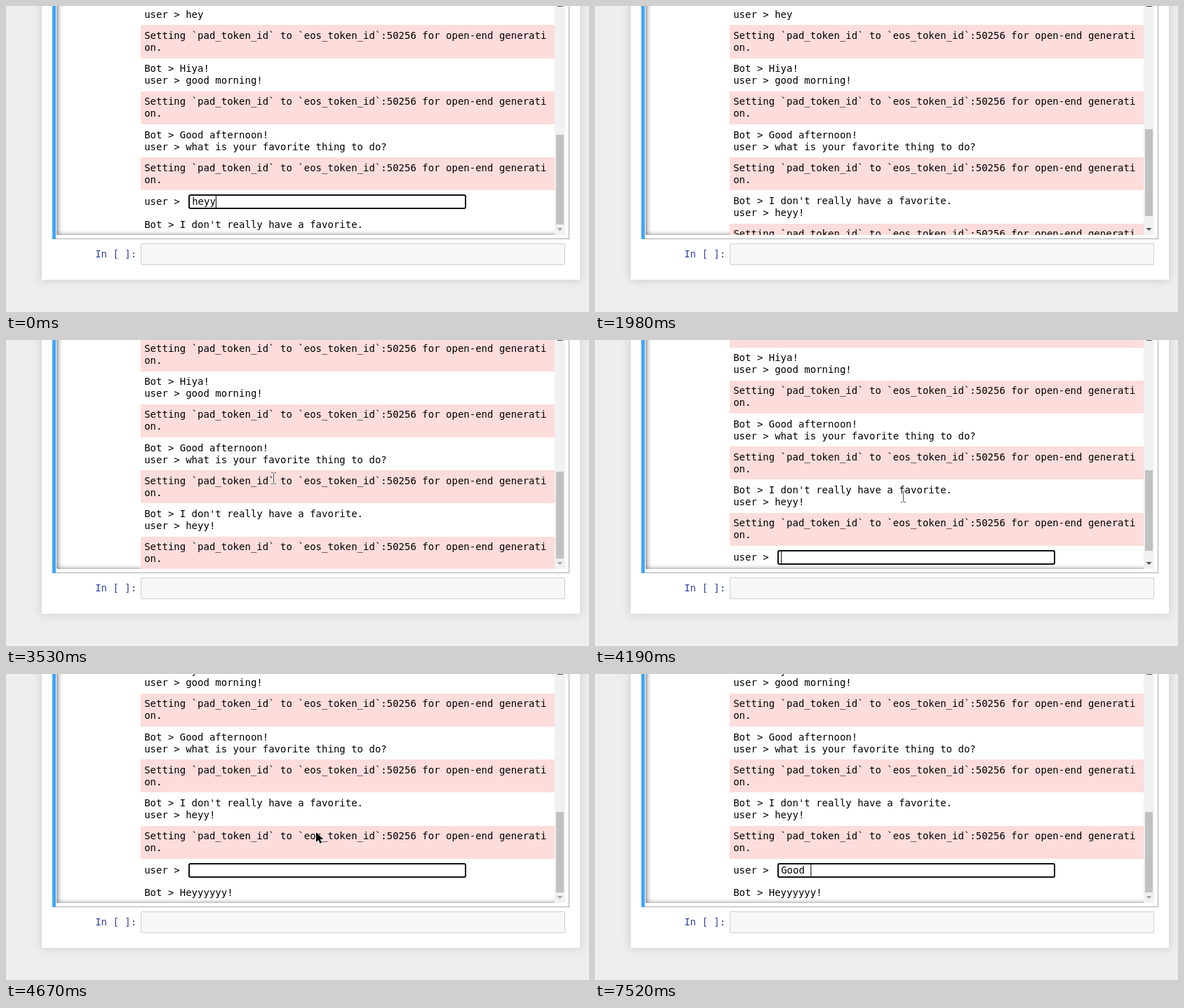
Animation of 831x437 px, one loop 8 s. Source, as an HTML page:

```html
<!DOCTYPE html>
<html lang="en">
<head>
<meta charset="utf-8">
<title>Notebook chat</title>
<style>
  html, body { margin: 0; width: 100%; height: 100%; overflow: hidden; background: #eee; }
  #stage { position: relative; width: 831px; height: 437px; overflow: hidden; background: #eee;
    font: 14px/17px "DejaVu Sans Mono", monospace; color: #000; }
  #stage div { position: absolute; box-sizing: border-box; white-space: pre; }
  #page { left: 51px; top: -40px; width: 767px; height: 431px; background: #fff;
    box-shadow: 0 0 12px 1px rgba(87, 87, 87, .2); }
  #cell { left: 66px; top: -40px; width: 737px; height: 373px; border: 1px solid #ababab; }
  #bar { left: 66px; top: 0; width: 5px; height: 333px; background: #42a5f5; }
  #shade { left: 72px; top: -40px; width: 725px; height: 367px; border-radius: 2px;
    box-shadow: inset 0 2px 8px rgba(0, 0, 0, .8); }
  #log { left: 0; top: 0; width: 782px; height: 327px; overflow: hidden; }
  #log .err { left: 192px; width: 590px; background: #fddcdc; }
  #log .line { left: 197.2px; height: 17px; }
  #log .field { left: 260px; width: 396px; height: 21px; background: #fff;
    border: 2px solid #101010; border-radius: 3px; }
  #log .typed { left: 265.2px; height: 17px; }
  #track { left: 782px; top: 0; width: 15px; height: 327px; background: #f1f1f1; }
  #thumb { left: 784px; width: 11px; background: #c1c1c1; }
  #prompt { left: 127.2px; top: 346px; color: #303f9f; }
  #editor { left: 192px; top: 339px; width: 605px; height: 31px; background: #f7f7f7;
    border: 1px solid #cfcfcf; border-radius: 2px; }
  svg { position: absolute; left: 0; top: 0; }
</style>
</head>
<body>
<div id="stage">
  <div id="page"></div>
  <div id="cell"></div>
  <div id="bar"></div>
  <div id="shade"></div>
  <div id="log"></div>
  <div id="track"></div>
  <div id="thumb"></div>
  <div id="editor"></div>
  <div id="prompt">In [ ]:</div>
  <svg width="831" height="437">
    <path d="M786 0h8v1h-8z" fill="#505050"/>
    <path id="down" d="M785.5 317h8l-4 4z"/>
    <path id="squiggle" fill="none" stroke="#f22" stroke-width="1.1"/>
    <rect id="caret" width="1" height="17"/>
    <path id="arrow" d="M0 0v14l3.3-3 2.3 5 2.4-1-2.2-5h4.6z" stroke="#fff" stroke-width="1.4" paint-order="stroke"/>
    <g id="beam" fill="none">
      <path d="M-3.5-8h2.5l1 1 1-1h2.5M0-7v14M-3.5 8h2.5l1-1 1 1h2.5" stroke="#fff" stroke-width="2.4" opacity=".6"/>
      <path d="M-3.5-8h2.5l1 1 1-1h2.5M0-7v14M-3.5 8h2.5l1-1 1 1h2.5" stroke="#555"/>
    </g>
  </svg>
</div>
<script>
const LOOP = 8000, BLOCK = 47.2, PAD = 6.6, LINE = 17, CHAR = 14 * 0.602;
const $ = id => document.getElementById(id);
const log = $('log');

const warning = ['Setting `pad_token_id` to `eos_token_id`:50256 for open-end generati', 'on.'];
const chat = [
  ['Bot > How is what?', 'user > hey'],
  ['Bot > Hiya!', 'user > good morning!'],
  ['Bot > Good afternoon!', 'user > what is your favorite thing to do?'],
  ["Bot > I don't really have a favorite.", 'user > heyy!'],
];

// Each track lists [time, value...]; a value holds until the next time.
const scrollTrack = [[0, 0], [1890, -17], [1980, 0], [2580, 1], [2680, 3], [2770, 6],
  [2850, 10], [2950, 17], [3050, 23], [3140, 28], [3240, 30], [4100, 64],
  [4390, 72], [4480, 83], [4580, 91], [4670, 94]];
const stageTrack = [[0, 'ask'], [1890, 'sent'], [1980, 'wait'], [4100, 'next']];
const textTrack = [[0, 'heyy'], [1390, 'heyy!'], [1890, ''], [6550, 'G'], [7040, 'Go'],
  [7230, 'Goo'], [7430, 'Good'], [7520, 'Good ']];
const caretTrack = [[0, 1], [500, 0], [1090, 1], [1890, 0], [4100, 1], [4670, 0],
  [5260, 1], [5860, 0], [6450, 1]];
const pointerTrack = [[0, ''], [2580, 'arrow', 430, 149], [2680, 'arrow', 418, 154], [2770, 'arrow', 408, 159],
  [2850, 'arrow', 402, 164], [2950, 'arrow', 393, 172], [3050, 'arrow', 385, 179], [3140, 'arrow', 378, 185],
  [3240, 'arrow', 375, 188], [3430, 'beam', 381.5, 197.5], [3710, 'beam', 381.5, 200.5],
  [3800, 'beam', 381.5, 203.5], [4100, 'beam', 420.5, 216.5], [4190, 'beam', 439.5, 223.5],
  [4390, 'arrow', 441, 225], [4580, 'arrow', 442, 226], [6840, '']];

const stages = {
  ask: { blocks: 6, reply: chat[3][0], thumb: () => [184, 128] },
  sent: { blocks: 7, thumb: () => [181, 131] },
  wait: { blocks: 8, thumb: scroll => [176.4 + scroll * 0.4, 124] },
  next: { blocks: 8, reply: 'Bot > Heyyyyyy!', thumb: scroll => [186 + (scroll - 64) * 0.367, 115] },
};

const at = (track, t) => track.filter(key => key[0] <= t).pop().slice(1);
const show = (el, on) => { el.style.display = on ? '' : 'none'; };

function add(className, text = '') {
  const el = document.createElement('div');
  el.className = className;
  el.textContent = text;
  log.append(el);
  return el;
}

const blocks = Array.from({ length: 8 }, (_, i) => {
  const isWarning = i % 2 === 1;
  return {
    box: isWarning ? add('err') : null,
    lines: (isWarning ? warning : chat[i / 2]).map(text => add('line', text)),
  };
});
const ask = add('line', 'user >');
const field = add('field');
const typed = add('typed');
const reply = add('line');

function placeLine(el, blockTop, row = 0) {
  el.style.top = Math.round(blockTop + PAD + row * LINE) + 'px';
}

function drawLog(stage, top) {
  blocks.forEach(({ box, lines }, i) => {
    const y = top + i * BLOCK, visible = i < stage.blocks;
    lines.forEach((el, row) => { show(el, visible); placeLine(el, y, row); });
    if (!box) return;
    show(box, visible);
    box.style.top = Math.round(y) + 'px';
    box.style.height = Math.round(y + BLOCK) - Math.round(y) + 'px';
  });
}

function drawInput(stage, top, t) {
  const active = Boolean(stage.reply);
  const blockTop = top + stage.blocks * BLOCK;
  const y = Math.round(blockTop + 6);
  const [text] = at(textTrack, t);
  [ask, field, typed, reply].forEach(el => show(el, active));
  field.style.top = y + 'px';
  ask.style.top = typed.style.top = y + 2 + 'px';
  typed.textContent = text;
  reply.textContent = stage.reply || '';
  placeLine(reply, blockTop + 33.8);

  show($('caret'), active && at(caretTrack, t)[0]);
  $('caret').setAttribute('x', 265.2 + text.length * CHAR);
  $('caret').setAttribute('y', y + 2);
  show($('squiggle'), t >= 900 && t < 1890);
}

function drawScrollbar(stage, scroll) {
  const [y, height] = stage.thumb(scroll);
  $('thumb').style.top = Math.round(y) + 'px';
  $('thumb').style.height = height + 'px';
  $('down').setAttribute('fill', Math.round(y) + height >= 312 ? '#a3a3a3' : '#505050');
}

function drawPointer(t) {
  const [kind, x, y] = at(pointerTrack, t);
  for (const id of ['arrow', 'beam']) {
    show($(id), id === kind);
    if (id === kind) $(id).setAttribute('transform', `translate(${x} ${y})`);
  }
}

function frame() {
  const t = performance.now() % LOOP;
  const stage = stages[at(stageTrack, t)[0]];
  const [scroll] = at(scrollTrack, t);
  const top = -19.8 - scroll;
  drawLog(stage, top);
  drawInput(stage, top, t);
  drawScrollbar(stage, scroll);
  drawPointer(t);
  requestAnimationFrame(frame);
}

$('squiggle').setAttribute('d', 'M265.5 286.5q1.5-2.4 3 0' + 't3 0'.repeat(10));
frame();
</script>
</body>
</html>
```
